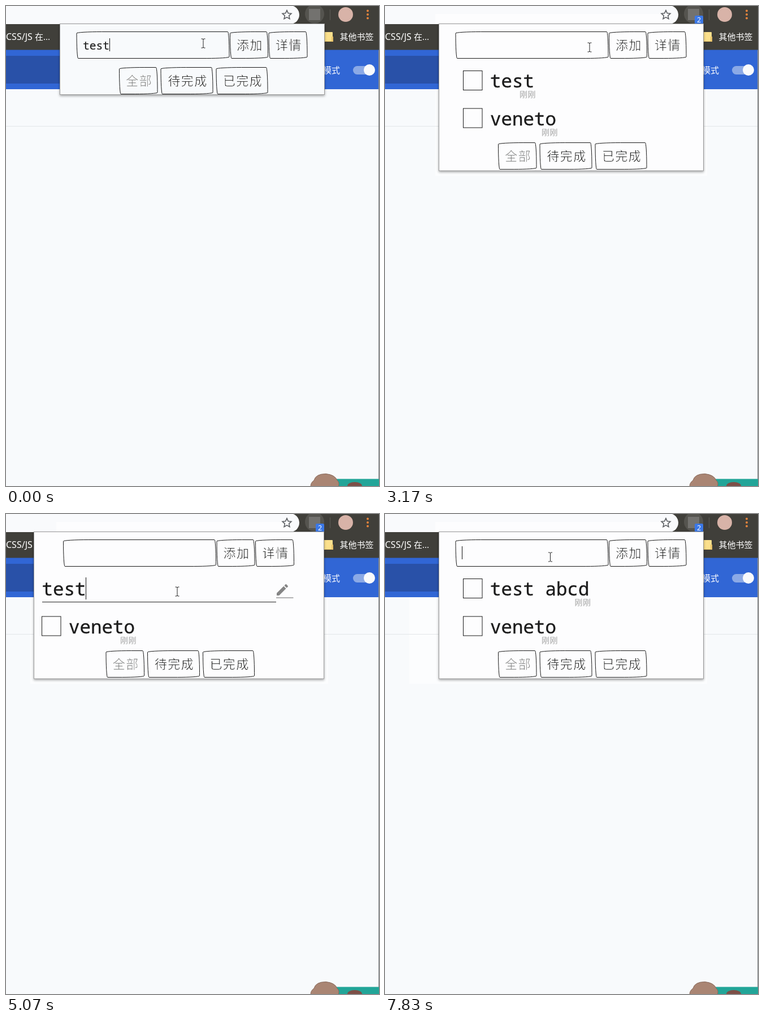
Animation, 660 px wide and 848 px high, one loop 8 s. Source, as an HTML page:

```html
<!DOCTYPE html>
<html lang="zh-CN">
<head>
<meta charset="utf-8">
<title>待办清单</title>
<style>
  html, body { margin: 0; width: 100%; height: 100%; overflow: hidden; background: #f8fafc; }
  svg { display: block; width: 660px; height: 848px; }
  text { white-space: pre; }
  .ui { font: 15px 'Noto Sans', 'Noto Sans CJK SC', 'Noto Sans CJK', sans-serif; fill: #fff; }
  .mono { font: 32.5px 'Noto Sans Mono', monospace; fill: #1c1c1c; stroke: #1c1c1c; stroke-width: .4; }
  .mono.small { font-size: 19.58px; stroke-width: .2; }
  /* a pale outline thins the strokes */
  .kai, .ago { font: 300 22px 'Noto Sans CJK SC', 'Noto Sans CJK', sans-serif; stroke: #fcfdfd; stroke-width: .7; }
  .kai { fill: #111; letter-spacing: 1.4px; text-anchor: middle; }
  .kai.off { fill: #777; }
  .ago { font-size: 14px; letter-spacing: .6px; fill: #6a6a6a; stroke-width: .35; }
  .line { fill: none; stroke: #1a1a1a; }
  .popup { stroke: #9c9c9c; filter: drop-shadow(0 2px 2px rgba(0, 0, 0, .35)); }
  .beam { fill: none; stroke: #222; }
</style>
</head>
<body>
<svg viewBox="0 0 660 848">
  <rect width="660" height="848" fill="#f8fafc"/>
  <g id="glow"></g>
  <path d="M0 212.5H660" stroke="#e3e6e9"/>

  <!-- page header -->
  <rect y="77" width="660" height="70" fill="#3166d5"/>
  <rect y="88" width="300" height="49" fill="#2951a8"/>
  <text class="ui" x="561" y="119">模式</text>
  <rect x="614" y="106" width="37" height="15" rx="7.5" fill="#8ba9e6"/>
  <circle cx="643" cy="113" r="10" fill="#f9fafc"/>

  <!-- toolbar and bookmarks -->
  <rect width="660" height="77.5" fill="#403f3a"/>
  <rect x="-20" y="-1" width="539" height="33" rx="16.5" fill="#f9fafc"/>
  <rect width="400" height="32" fill="#f9fafc"/>
  <g id="glowBar"></g>
  <path d="M497 7.6l2.3 5.1 5.6.6-4.2 3.8 1.2 5.5-4.9-2.8-4.9 2.8 1.2-5.5-4.2-3.8 5.6-.6z"
        fill="none" stroke="#5a5d61" stroke-width="1.6"/>
  <circle cx="546" cy="14" r="17" fill="#55544f"/>
  <rect x="536" y="5" width="20" height="20" fill="#73726f"/>
  <path d="M573.5 6V25" stroke="#5d5c57"/>
  <circle cx="601" cy="15" r="13" fill="#d8b3a8"/>
  <g fill="#e5843c">
    <circle cx="640" cy="8.5" r="2"/><circle cx="640" cy="15" r="2"/><circle cx="640" cy="21.5" r="2"/>
  </g>
  <text class="ui" x="0" y="60" style="font-size:16px">CSS/JS</text>
  <text class="ui" x="51" y="60">在...</text>
  <rect x="560" y="46" width="18" height="17" rx="1" fill="#fbe08c"/>
  <path d="M576 54h3v9h-14v-1h11z" fill="#e9c46a"/>
  <text class="ui" x="590.5" y="60">其他书签</text>

  <!-- page corner -->
  <path d="M659.5 78V848" stroke="#85888c"/>
  <rect x="580" y="835.5" width="80" height="13" fill="#22a598"/>
  <ellipse cx="617" cy="848" rx="13" ry="7" fill="#7d4f47"/>
  <path d="M539 849Q539 842 545 838Q548 826.5 566 826.5Q582 828 586 838Q591 842 588 849Z"
        fill="#aa8573" stroke="#87685a"/>

  <g id="live"></g>
</svg>

<script>
const LOOP = 8000, PITCH = 66.5, BIG = 19.5, SMALL = 11.75;
const $ = id => document.getElementById(id);

// [start, value] pairs; the latest one begun is in force
const TYPED = [[0, 'test'], [150, ''], [830, 'v'], [1100, 'ven'], [1250, 'vene'],
  [1650, 'venet'], [1780, 'veneto'], [2180, '']];
const EDITED = [[0, 'test'], [5350, 'test '], [5500, 'test  '], [5770, 'test  a'],
  [6050, 'test  ab'], [6330, 'test  abc'], [6730, 'test  abcd']];
const TOP_CARET = [[0, 1], [2740, 0], [3320, 1], [3780, 0], [7830, 1]];
const EDIT_CARET = [[0, 1], [4490, 0], [5070, 1], [7280, 0]];
const POINTER = [[0, ['beam', 349, 66]], [3170, ['beam', 362, 73]], [3320, ['beam', 353, 86]],
  [3470, ['arrow', 334, 114]], [3630, ['hand', 316, 130]], [3780, ['hand', 310.5, 133.5]],
  [3930, ['beam', 312, 142]], [4210, ['beam', 308, 140]], [4350, ['beam', 305, 138]],
  [4490, ['beam', 303, 137]], [7410, ['beam', 298, 112]], [7550, ['beam', 292.5, 76]]];

const at = (list, t) => list.filter(e => e[0] <= t).pop()[1];

const text = (cls, x, y, s) => `<text class="${cls}" x="${x}" y="${y}">${s}</text>`;
const rect = (x, y, w, h, attrs) => `<rect x="${x}" y="${y}" width="${w}" height="${h}" ${attrs}/>`;
const caret = (x, y, h) => rect(x, y, 1, h, 'fill="#111"');

// hand-drawn looking frame: uneven elliptical corners
function sketch(x, y, w, h) {
  const k = Math.min(w, h) / 270, a = 255 * k, b = 15 * k, c = 225 * k, r = x + w, m = y + h;
  return `<path class="line" d="M${x + a} ${y}H${r - b}A${b} ${c} 0 0 1 ${r} ${y + c}V${m - b}` +
    `A${c} ${b} 0 0 1 ${r - c} ${m}H${x + b}A${b} ${a} 0 0 1 ${x} ${m - a}A${a} ${b} 0 0 1 ${x + a} ${y}Z"/>`;
}

const button = (x, y, w, label, cls = '') =>
  sketch(x, y, w, 47) + text('kai ' + cls, x + w / 2 + 1.5, y + 31.7, label);

function item(x, row, label) {
  const dy = row * PITCH, end = x + 48 + label.length * BIG;
  return rect(x + .5, 114.5 + dy, 33.5, 34, 'class="line"') +
    text('mono', x + 48, 144.4 + dy, label) + text('ago', end - 26, 161.2 + dy, '刚刚');
}

const pencil = x => `<path transform="translate(${x - 2.3} 120.7) scale(1.11)" fill="#858585"
  d="M3 17.25V21h3.75L17.81 9.94l-3.75-3.75zM20.71 7.04a1 1 0 0 0 0-1.41l-2.34-2.34a1 1 0 0 0-1.41 0l-1.83 1.83 3.75 3.75z"/>
  <path d="M${x} 148H${x + 30.5}" stroke="#999" stroke-width="1.5"/>`;

const cross = '<path d="M342 121.5L365 144.5M365 121.5L342 144.5" stroke="#777" stroke-width="2.6"/>';

const SHAPES = {
  beam: '<path class="beam" d="M-3.5-8h2.5l1 1 1-1h2.5M0-7V7M-3.5 8h2.5l1-1 1 1h2.5"/>',
  arrow: '<path d="M0 0V17l4-3.8 2.6 6 2.6-1.1-2.6-5.9h5.4z" fill="#fff" stroke="#111"/>',
  hand: `<path fill="#fff" stroke="#222" stroke-width="1.2" d="M-.5 0c-1 0-1.5.9-1.5 2v9l-1.5-2c-1-1.2-3-.9-3 .8
    0 .6.3 1.2.6 1.7l4 6.5c.6 1 .8 1.8.8 3v2h10v-2c0-1.5 1.5-3 1.5-6v-5c0-2.2-3-2.4-3-.4 0-2.2-2.8-2.5-3-.6
    0-2-3-2.2-3-.3v-6.7c0-1.1-.6-2-1.9-2z"/><path class="beam" d="M1.4 8.7v3M4.4 9v3M7.4 9.6v2.4"/>`
};

function editor(t) {
  const s = at(EDITED, t);
  return text('mono', 63.5, 144.4, s) + '<path d="M64 155.5H478" stroke="#222"/>' +
    (at(EDIT_CARET, t) ? caret(Math.floor(63.6 + s.length * BIG), 112, 39) : '') +
    (t < 7410 ? pencil(478) : '');
}

function scene(t) {
  const count = t < 150 ? 0 : t < 2180 ? 1 : 2;
  const editing = t >= 3930 && t < 7830;
  const hover = t >= 3470 && t < 3930;
  const left = editing ? 49.5 : 95.5, right = editing ? 562.5 : 563.5;
  const dx = editing ? -23.5 : 0, rowX = editing ? 63 : 138;
  const bottom = count ? 158 + count * PITCH : 156.5;
  const tabY = 108.5 + count * PITCH;
  const typed = at(TYPED, t);
  let out = '';

  if (count) out += rect(548, 17, 15, 15, 'rx="2" fill="#3b78e7"') +
    `<text class="ui" x="555.5" y="29.3" text-anchor="middle" style="font-size:12.5px">${count}</text>`;

  out += rect(left, 31.5, right - left, bottom - 31.5, `class="popup" fill="${count ? '#fdfdfe' : '#f8fafc'}"`);
  out += sketch(125 + dx, 45.5, 270, 47) + button(396.5 + dx, 45.5, 67, '添加') + button(465 + dx, 45.5, 68, '详情');
  out += text('mono small', 136, 77, typed);
  if (!editing && at(TOP_CARET, t)) out += caret(Math.floor(136 + typed.length * SMALL), 57, 23);

  if (editing) out += editor(t);
  else if (count) out += item(rowX, 0, t < 7830 ? 'test' : 'test abcd');
  if (count > 1) out += item(rowX, 1, 'veneto');
  if (hover) out += pencil(299) + cross;

  out += button(200.5 + dx, tabY, 67.5, '全部', 'off') + button(274 + dx, tabY, 92, '待完成') +
    button(372 + dx, tabY, 91, '已完成');

  const [shape, x, y] = at(POINTER, t);
  return out + `<g transform="translate(${x} ${y})">${SHAPES[shape]}</g>`;
}

// faint light area left around the popup
function glow(t) {
  if (t < 150) return '';
  const x = t < 3930 ? 89 : 43, h = t < 2180 ? 219 : 285;
  return rect(x, 15, 570 - x, h, 'fill="#fcfdfe"');
}

const shown = {};
function put(id, html) {
  if (shown[id] !== html) $(id).innerHTML = shown[id] = html;
}

const start = performance.now();
function frame() {
  const t = (performance.now() - start) % LOOP;
  put('glow', glow(t));
  put('glowBar', t < 150 ? '' : rect(89, 14, 414, 18, 'fill="#fdfdfe"'));
  put('live', scene(t));
  requestAnimationFrame(frame);
}
frame();
</script>
</body>
</html>
```
